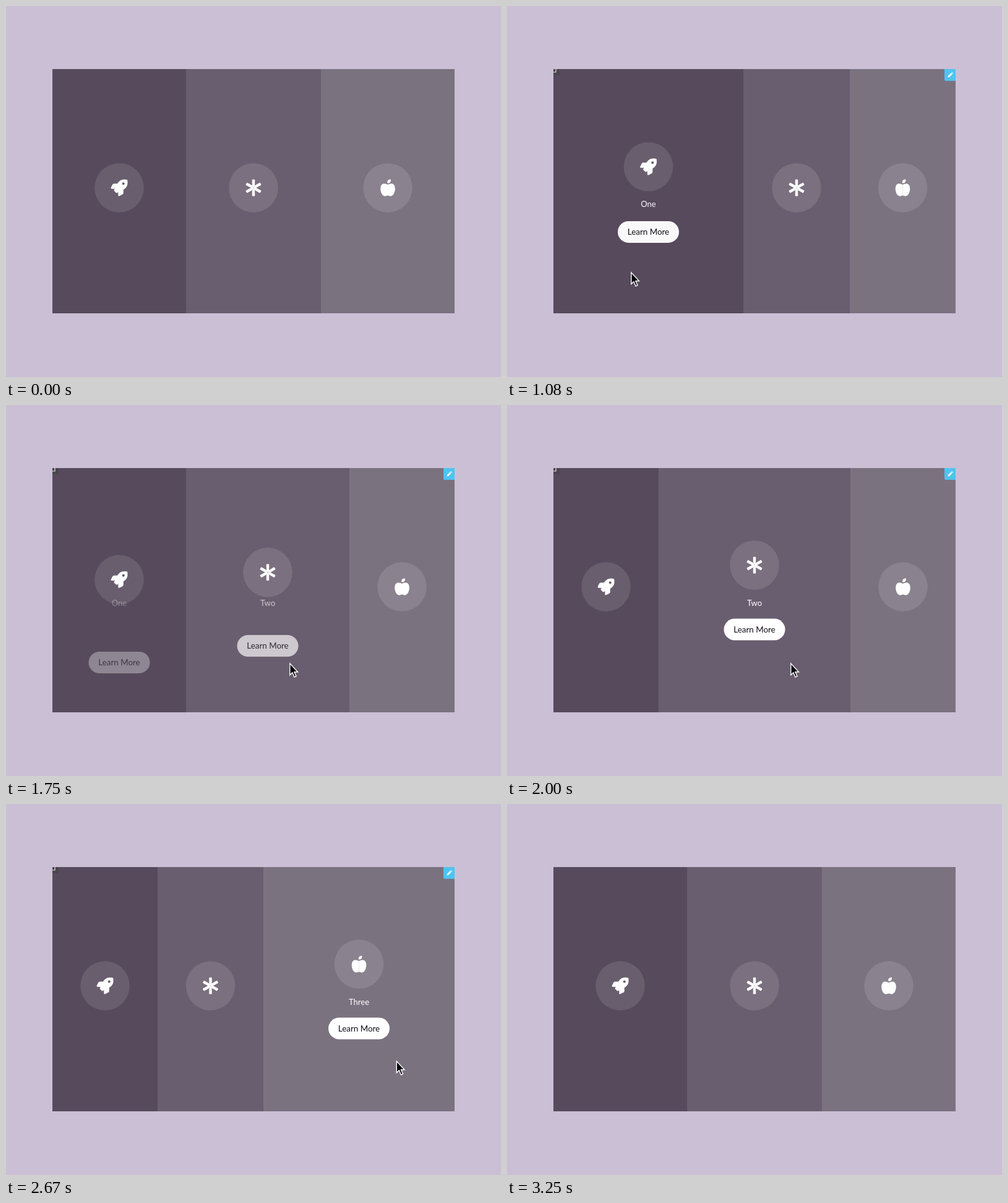
An HTML page for the animation above (5 s loop, 800x600 px).

```html
<!DOCTYPE html>
<html lang="en">
<head>
<meta charset="utf-8">
<title>Expanding panels</title>
<style>
  html, body { margin: 0; width: 100%; height: 100%; overflow: hidden; background: #cbbfd6; }
  svg { display: block; width: 800px; height: 600px; }
  text { font: 13px Lato, sans-serif; text-anchor: middle; fill: #fff; }
  .button text { font-size: 13.4px; fill: #120d16; }
  .button rect, .icon { fill: #fff; }
</style>
</head>
<body>
<svg viewBox="0 0 800 600">
  <defs>
    <clipPath id="card"><rect x="75" y="102" width="650" height="395"/></clipPath>
    <path id="rocket" fill-rule="evenodd" d="M505 19Q503 9 493 7Q461 0 410 0C307 0 245 55 199 128H95Q66 130 52 154L3 253Q-6 283 24 288H128L105 310Q86 333 105 356L156 407Q179 425 202 407L224 384V488Q228 517 259 509L357 460Q382 446 384 417V313C457 267 512 204 512 102Q512 51 505 19ZM384 168A40 40 0 1 1 384 88A40 40 0 1 1 384 168Z"/>
    <path id="arm" d="M-40 -69L-43 -231Q-44 -256 -19 -256H19Q44 -256 43 -231L40 -69L0 0Z"/>
    <g id="asterisk" transform="translate(256 256)"></g>
    <path id="half" d="M257 160C215 138 160 122 130 129C70 140 42 190 35 249C28 300 36 335 42 360C62 460 115 512 180 512Q198 512 225 500Q238 494 257 494Z"/>
    <g id="apple">
      <use href="#half"/>
      <use href="#half" transform="matrix(-1 0 0 1 512 0)"/>
      <path d="M328 88C305 109 275 114 241 111Q235 55 264 24C287 3 318 -1 351 1Q354 60 328 88Z"/>
    </g>
  </defs>
  <rect width="800" height="600" fill="#cbbfd6"/>
  <g id="stage" clip-path="url(#card)">
    <g id="panels"></g>
    <g id="tools">
      <rect x="75" y="102" width="10" height="10" fill="#4b454e"/>
      <path d="M75 107H79V102" fill="none" stroke="#e4e1e6" stroke-width="1.2"/>
      <path d="M707 102H725V121H709Q707 121 707 119Z" fill="#4fc4f0"/>
      <path d="M712.5 115.5L713.2 112.8L717.4 108.6L719.4 110.6L715.2 114.8ZM718 108L719 107L721 109L720 110Z" fill="#fff"/>
    </g>
    <path id="cursor" d="M.8 1V19.6L4.9 15.8L8 23L11 21.7L7.9 14.7H13.5Z" fill="#000" stroke="#fff" stroke-width="1.4"/>
  </g>
</svg>
<script>
const LOOP = 5000, FPS = 12, FADE = 300;
const LEFT = 75, RIGHT = 725, REST = [291, 509];
const panels = [
  { name: 'One', icon: 'rocket', fill: '#564a5c', on: 850, off: 1633, edges: [385, 555] },
  { name: 'Two', icon: 'asterisk', fill: '#695e6f', on: 1633, off: 2350, edges: [245, 555] },
  { name: 'Three', icon: 'apple', fill: '#7b7280', on: 2350, off: 2930, edges: [245, 416] }
];
// time, x, y of the pointer tip
const path = [
  [750, 208, 500], [833, 205, 453], [1000, 200, 430], [1380, 200, 430],
  [1740, 458, 417], [2150, 458, 417], [2520, 630.5, 415], [2710, 630.5, 415], [2960, 628, 500]
];

const $ = id => document.getElementById(id);
const clamp = v => Math.min(1, Math.max(0, v));
const smooth = u => u * u * (3 - 2 * u);
const move = (el, x, y) => el.setAttribute('transform', `translate(${x} ${y})`);

// cubic-bezier(.25, .1, .25, 1)
function ease(x) {
  if (x <= 0) return 0;
  if (x >= 1) return 1;
  let lo = 0, hi = 1, s;
  for (let i = 0; i < 24; i++) {
    s = (lo + hi) / 2;
    const bx = 0.75 * s * (1 - s) + s ** 3;
    if (bx < x) lo = s; else hi = s;
  }
  return 0.3 * s * (1 - s) ** 2 + 3 * s * s * (1 - s) + s ** 3;
}

$('asterisk').innerHTML = [0, 60, 120, 180, 240, 300]
  .map(a => `<use href="#arm" transform="rotate(${a})"/>`).join('');

$('panels').innerHTML = panels.map(p => `
  <rect class="back" y="102" height="395" fill="${p.fill}"/>`).join('') + panels.map(p => `
  <g class="content">
    <text class="label" y="325">${p.name}</text>
    <g class="badge">
      <circle r="39.8" fill="#fff" fill-opacity=".11"/>
      <use class="icon" href="#${p.icon}" transform="scale(.0527) translate(-256 -256)"/>
    </g>
    <g class="button">
      <rect x="-49.5" y="-17.5" width="99" height="35" rx="17.5"/>
      <text y="4.8">Learn More</text>
    </g>
  </g>`).join('');

const backs = document.querySelectorAll('.back');
const contents = [...document.querySelectorAll('.content')].map(el => ({
  el,
  label: el.querySelector('.label'),
  badge: el.querySelector('.badge'),
  button: el.querySelector('.button')
}));

function pointer(t) {
  const i = path.findIndex(k => k[0] > t);
  if (i < 1) return path[i ? path.length - 1 : 0].slice(1);
  const [t0, x0, y0] = path[i - 1], [t1, x1, y1] = path[i];
  const u = smooth((t - t0) / (t1 - t0));
  return [x0 + (x1 - x0) * u, y0 + (y1 - y0) * u];
}

function draw(t) {
  const open = panels.map(p => clamp(ease((t - p.on) / FADE) - ease((t - p.off) / FADE)));
  const inner = REST.map((r, e) =>
    Math.round(panels.reduce((x, p, i) => x + open[i] * (p.edges[e] - r), r)));
  const edges = [LEFT, ...inner, RIGHT];
  contents.forEach((c, i) => {
    const a = edges[i], b = edges[i + 1], k = open[i];
    backs[i].setAttribute('x', a);
    backs[i].setAttribute('width', b - a);
    move(c.el, (a + b) / 2, 0);
    move(c.badge, 0, 294 - 35 * k);
    move(c.button, 0, 363 + 80 * (1 - k));
    c.label.setAttribute('opacity', k);
    c.button.setAttribute('opacity', k);
  });
  const hovered = t >= panels[0].on && t < panels[2].off;
  $('tools').setAttribute('visibility', hovered ? 'visible' : 'hidden');
  move($('cursor'), ...pointer(t));
}

// The picture is held at 12 steps a second, timed in hundredths.
function tick() {
  const c = Math.floor((performance.now() - start) % LOOP / 10);
  draw(Math.floor((c + 0.49) * FPS / 100) * 1000 / FPS);
  requestAnimationFrame(tick);
}
const start = performance.now();
tick();
</script>
</body>
</html>
```
